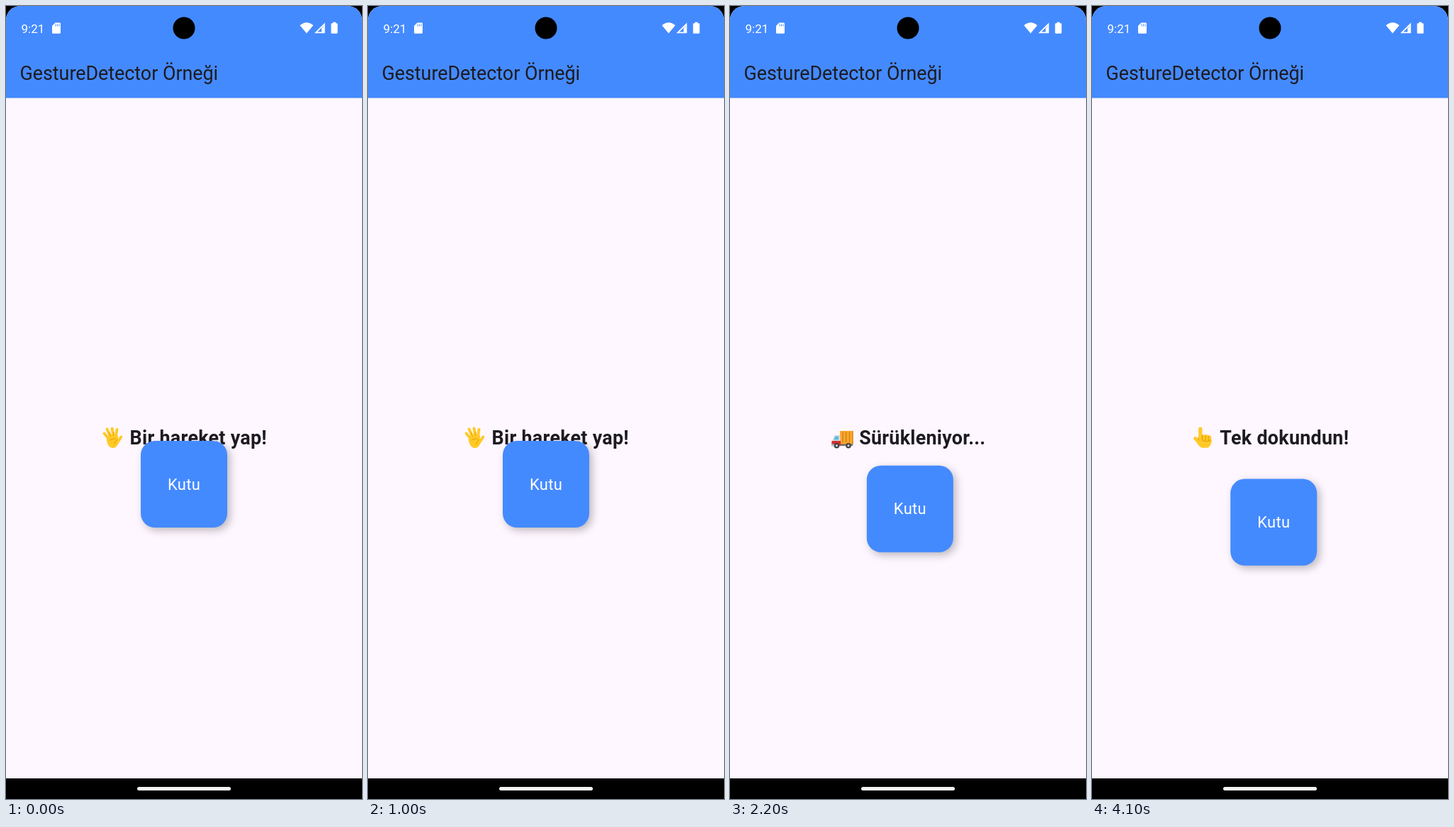
An HTML page that plays this animation: 502x1116 px, repeating every 5000 ms.

```html
<!DOCTYPE html>
<html lang="tr">
<head>
<meta charset="utf-8">
<title>Hareket</title>
<style>
  html, body { margin: 0; width: 100%; height: 100%; overflow: hidden; background: #000; }
  svg { display: block; width: 100vw; height: 100vh; }
  text { font-family: Roboto, "Noto Sans", sans-serif; }
  .title { font-size: 26.84px; fill: #1d1b20; }
  .clock { font-size: 17.1px; fill: #fff; }
  .msg { font-size: 26.84px; font-weight: 700; letter-spacing: .3px; fill: #1d1b20; text-anchor: middle; }
  .label { font-size: 21.96px; letter-spacing: .3px; fill: #fff; text-anchor: middle; }
  .tile { fill: #448aff; filter: drop-shadow(4.9px 4.9px 6px rgba(0, 0, 0, .26)); }
  .round { fill: none; stroke-linecap: round; stroke-linejoin: round; }
</style>
</head>
<body>
<svg viewBox="0 0 502 1116">
  <rect width="502" height="1116" fill="#000"/>
  <path d="M0 1087V20A20 20 0 0 1 20 0H482A20 20 0 0 1 502 20V1087Z" fill="#fef7ff"/>
  <path d="M0 129.5V20A20 20 0 0 1 20 0H482A20 20 0 0 1 502 20V129.5Z" fill="#448aff"/>
  <circle cx="251" cy="31" r="15.5" fill="#000"/>
  <rect x="185" y="1099" width="132" height="5" rx="2.5" fill="#f4f4f4"/>

  <!-- status bar -->
  <text class="clock" x="21.5" y="37.6">9:21</text>
  <g fill="#fff">
    <path d="M69.5 23.5H75.6Q77 23.5 77 25V37.4Q77 38.8 75.6 38.8H66.5Q65 38.8 65 37.4V28Z"/>
    <path d="M414.5 27.2Q424 19.500 433.300 27.200L423.900 38.500Z"/>
    <path fill-rule="evenodd" d="M449.700 23.500V38.200H434.800ZM448 28L439 36.600H445V31.400L448 28.400Z"/>
    <path d="M461 22.800H465V24.300H466.300Q467.600 24.300 467.600 25.600V37.500Q467.600 38.800 466.300 38.800H459.700Q458.400 38.800 458.400 37.500V25.600Q458.400 24.300 459.700 24.300H461Z"/>
  </g>
  <path d="M70 25.500V28.500M72.500 25.500V28.500M75 25.500V28.500" stroke="#448aff" stroke-width="1"/>

  <text class="title" x="19.5" y="104.2">GestureDetector Örneği</text>

  <!-- open hand -->
  <g class="icon round" stroke="#ffca28">
    <path d="M144 608L138.600 601.500M147 605L142.500 595.500M151 604L149.600 594.500M155 605L156.500 596M156 616L162.300 606.500" stroke-width="4"/>
    <path d="M143.500 606Q150 602.500 156.600 605L157.500 613Q156 620.800 150.500 621Q145 620.500 143 611Z" fill="#ffca28" stroke-width="2.500"/>
    <path d="M147.300 605L145.200 600M151.800 604V599.500M157 610Q153.500 612.500 152.500 616.500M146 611Q150.500 608.500 154.500 609" stroke="#e59600" stroke-width=".9"/>
  </g>

  <!-- truck -->
  <g class="icon">
    <rect x="155" y="598" width="18.500" height="19.500" rx=".8" fill="#ffa726"/>
    <path d="M159 599V614M163.700 599V614M168.400 599V614M173 598V617" stroke="#b87522" stroke-width="1"/>
    <path d="M147.500 604H155.500V615H144.500V611Z" fill="#d5dce0"/>
    <path d="M148.500 605.500H153V610.500H146.300Z" fill="#62b8dc"/>
    <path d="M143.500 612H156V619H143Z" fill="#d32f2f"/>
    <path d="M156 616.500H173V619H156Z" fill="#6d6d6d"/>
    <path d="M143 616.500H147V619.500H143Z" fill="#b0bec5"/>
    <g fill="#c8d0d4" stroke="#424242" stroke-width="2.200">
      <circle cx="150.500" cy="618.700" r="2.700"/>
      <circle cx="167" cy="618.700" r="2.700"/>
    </g>
  </g>

  <!-- stop sign -->
  <path class="icon" d="M143.200 592.800H155.400L164.100 601.500V613.700L155.400 622.300H143.200L134.500 613.700V601.500Z" fill="#f44336" stroke="#d9372c" stroke-width=".8"/>

  <!-- pointing finger -->
  <g class="icon round" stroke="#ffca28">
    <path d="M152.800 610V595.200" stroke-width="5.200"/>
    <path d="M152 615L145.500 608.500" stroke-width="4.800"/>
    <path d="M152.500 607.500Q158 602.500 166.500 606L167.500 612Q167 618 163 620.500H155Q150.500 618 148.500 613Z" fill="#ffca28" stroke-width="2.500"/>
    <path d="M155.600 603.500V610.500M160 604.500V611M164.200 605.500V611.500M155 611Q161 614.500 167 611.500M150 607V611" stroke="#e59600" stroke-width="1"/>
  </g>

  <text class="msg" id="msg" x="271.3" y="616.800"></text>

  <g id="box">
    <rect class="tile" width="122" height="122" rx="20"/>
    <text class="label" x="61.100" y="68.700">Kutu</text>
  </g>
</svg>
<script>
  const LOOP = 5000, TICK = 100;

  // start time, message; icons follow the same order
  const messages = [
    [0, "Bir hareket yap!"],
    [1800, "Sürükleniyor..."],
    [2700, "Sürükleme bitti!"],
    [4100, "Tek dokundun!"]
  ];

  // drag path: time, x, y
  const path = [
    [1700, 190, 612],
    [1800, 190.3, 619],
    [2000, 191.5, 634.3],
    [2300, 193.5, 653],
    [2500, 195.2, 665.6]
  ];

  const msg = document.getElementById("msg");
  const box = document.getElementById("box");
  const icons = document.querySelectorAll(".icon");

  function boxAt(t) {
    if (t <= path[0][0]) return path[0].slice(1);
    for (let i = 1; i < path.length; i++) {
      const [t0, x0, y0] = path[i - 1];
      const [t1, x1, y1] = path[i];
      if (t <= t1) {
        const k = (t - t0) / (t1 - t0);
        return [x0 + (x1 - x0) * k, y0 + (y1 - y0) * k];
      }
    }
    return path[path.length - 1].slice(1);
  }

  let shown = -1;
  function draw(now) {
    const t = Math.floor((now % LOOP) / TICK) * TICK;
    if (t !== shown) {
      shown = t;
      const n = messages.filter(m => m[0] <= t).length - 1;
      msg.textContent = messages[n][1];
      icons.forEach((icon, i) => icon.style.display = i === n ? "" : "none");
      box.setAttribute("transform", `translate(${boxAt(t).join(" ")})`);
    }
  }

  const start = performance.now();
  function frame() {
    draw(performance.now() - start);
    requestAnimationFrame(frame);
  }
  frame();
</script>
</body>
</html>
```
